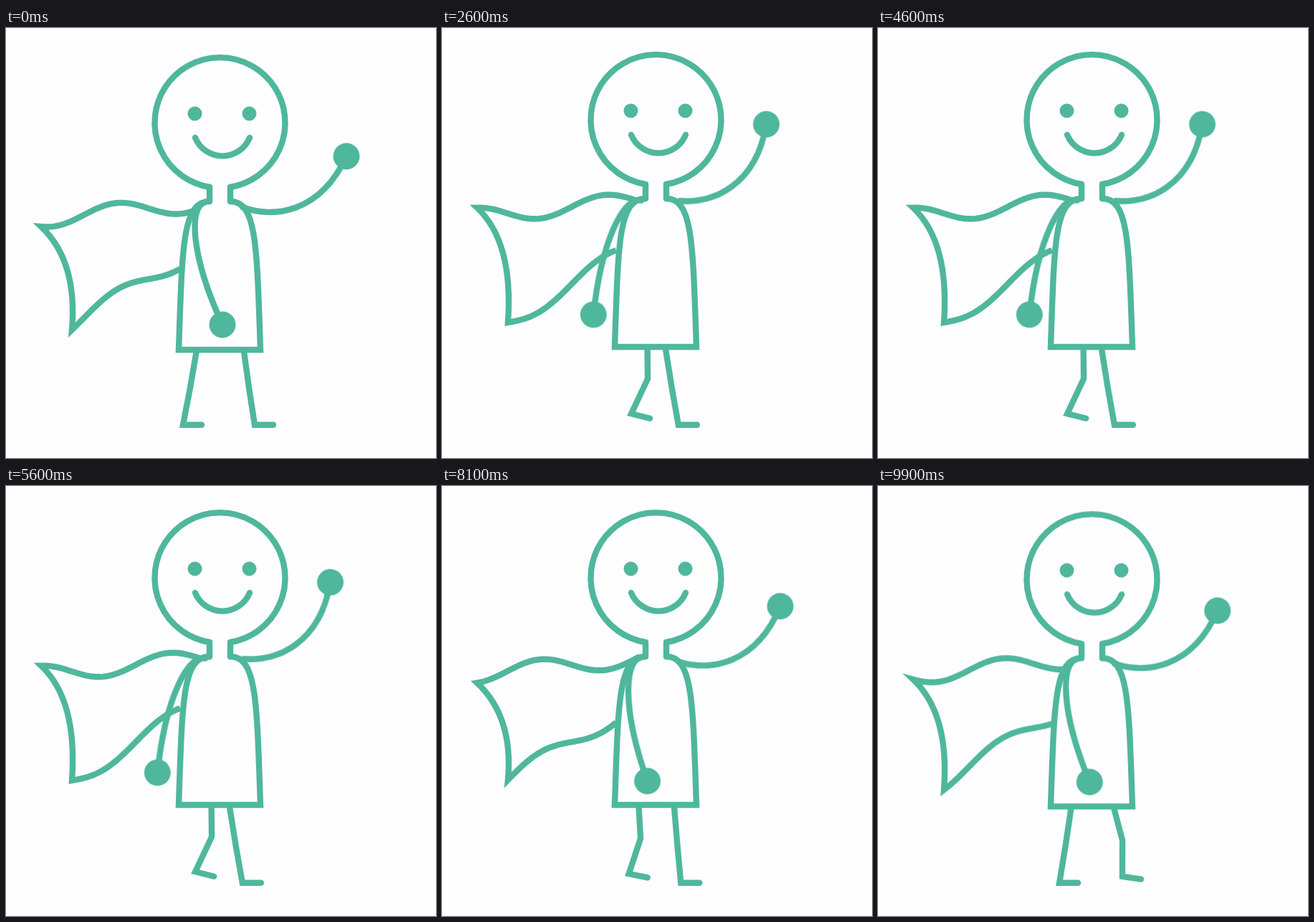
An HTML page for the animation above (10000 ms loop, 600 by 600 pixels).

```html
<!DOCTYPE html>
<html lang="en">
<head>
<meta charset="utf-8">
<title>Walking caped figure</title>
<style>
  html, body { margin: 0; width: 100%; height: 100%; overflow: hidden; background: #fefdff; }
  svg { display: block; width: 100%; height: 100%; }
  .line { fill: none; stroke: #4fb79c; stroke-width: 8.4; stroke-miterlimit: 10; }
  .round { stroke-linecap: round; stroke-linejoin: round; }
  .leg { stroke-linecap: round; }
  .torso { fill: #fefdff; stroke-linecap: round; }
  .dot { fill: #4fb79c; }

  .bob, .wave, .swing { animation: bob 1s ease-in-out infinite; }
  .wave { animation-name: wave; transform-origin: 313px 238px; }
  .swing { animation-name: swing; transform-origin: 275px 240px; }

  @keyframes bob {
    0%, 50%, 100% { transform: translateY(4px); }
    20%, 70% { transform: translateY(-4px); }
  }
  @keyframes wave {
    0%, 100% { transform: rotate(0deg); }
    40% { transform: rotate(-20deg); }
  }
  @keyframes swing {
    0%, 100% { transform: rotate(0deg); }
    40% { transform: rotate(40deg); }
  }
</style>
</head>
<body>
<svg viewBox="0 0 600 600">
  <g class="bob"><path id="cape" class="line"/></g>
  <path id="far" class="line leg"/>
  <path id="near" class="line leg"/>
  <g class="bob">
    <path class="line torso" d="M284 238 C246 238 246 300 241 445 H355 C350 300 350 238 313 238"/>
    <path class="line round" d="M284 238 V218 A91 91 0 1 1 313 218 V238"/>
    <circle class="dot" cx="263.5" cy="115.5" r="10"/>
    <circle class="dot" cx="339.5" cy="115.5" r="10"/>
    <path class="line round" d="M264 149 A41 41 0 0 0 340 149"/>
    <g class="wave">
      <path class="line round" d="M330 246 C372 262 438 255 475 175"/>
      <circle class="dot" cx="475" cy="175" r="18.5"/>
    </g>
    <g class="swing">
      <path class="line round" d="M278 239 C255 245 257 312 302 410"/>
      <circle class="dot" cx="302" cy="410" r="18.5"/>
    </g>
  </g>
</svg>
<script>
  const step = 100, loop = 10000, cycle = 1000;
  const turn = 0.4; // part of the cycle at which the limbs swing back
  const ground = 553.8;
  const shape = id => document.getElementById(id);
  const ease = t => t ** 1.75 / (t ** 1.75 + (1 - t) ** 1.75);

  // Straight edge from (x0, y0) to (x1, y1) with a ripple running to the left.
  function ripple(x0, y0, x1, y1, phase) {
    const count = 50, points = [];
    for (let i = 0; i <= count; i++) {
      const x = x0 + (x1 - x0) * i / count;
      const y = y0 + (y1 - y0) * i / count;
      const angle = 2 * Math.PI * ((x - 154) / 180 + phase);
      points.push([x, y - 12 * Math.cos(angle)]);
    }
    return points;
  }

  function capePath(phase) {
    const top = ripple(276, 240, 49, 262.7, phase);
    const bottom = ripple(92, 410.5, 243, 320, phase);
    const tip = top[top.length - 1];
    return `M${top.join("L")} Q100 ${tip[1] + 48} ${bottom.join("L")}`;
  }

  // side is 1 for the leg that starts in front, -1 for the other.
  function legPath(phase, side) {
    const rising = phase < turn;
    const part = rising ? phase / turn : (phase - turn) / (1 - turn);
    const swing = rising ? ease(part) : 1 - ease(part);
    const lifted = rising === (side < 0);
    const lift = lifted ? 18 * Math.sin(Math.PI * part) : 0;

    const hip = 299 + side * 32 * (1 - 1.8 * swing);
    const ankle = 297 + side * 50 * (1 - 2.15 * swing);
    const heel = ground - lift;
    const knee = [(hip + ankle) / 2 + 0.75 * lift, (450 + heel) / 2 - 0.3 * lift];
    return `M${hip} 444 L${knee} L${ankle} ${heel} l26 ${0.42 * lift}`;
  }

  const moves = document.getAnimations();
  const start = performance.now();
  moves.forEach(move => move.pause());

  // The walk is shown at ten poses per second.
  function draw() {
    const time = (performance.now() - start) % loop;
    const held = Math.floor(time / step) * step;
    const phase = held % cycle / cycle;
    moves.forEach(move => { move.currentTime = held; });
    shape("cape").setAttribute("d", capePath(phase));
    shape("far").setAttribute("d", legPath(phase, -1));
    shape("near").setAttribute("d", legPath(phase, 1));
    requestAnimationFrame(draw);
  }
  draw();
</script>
</body>
</html>
```
